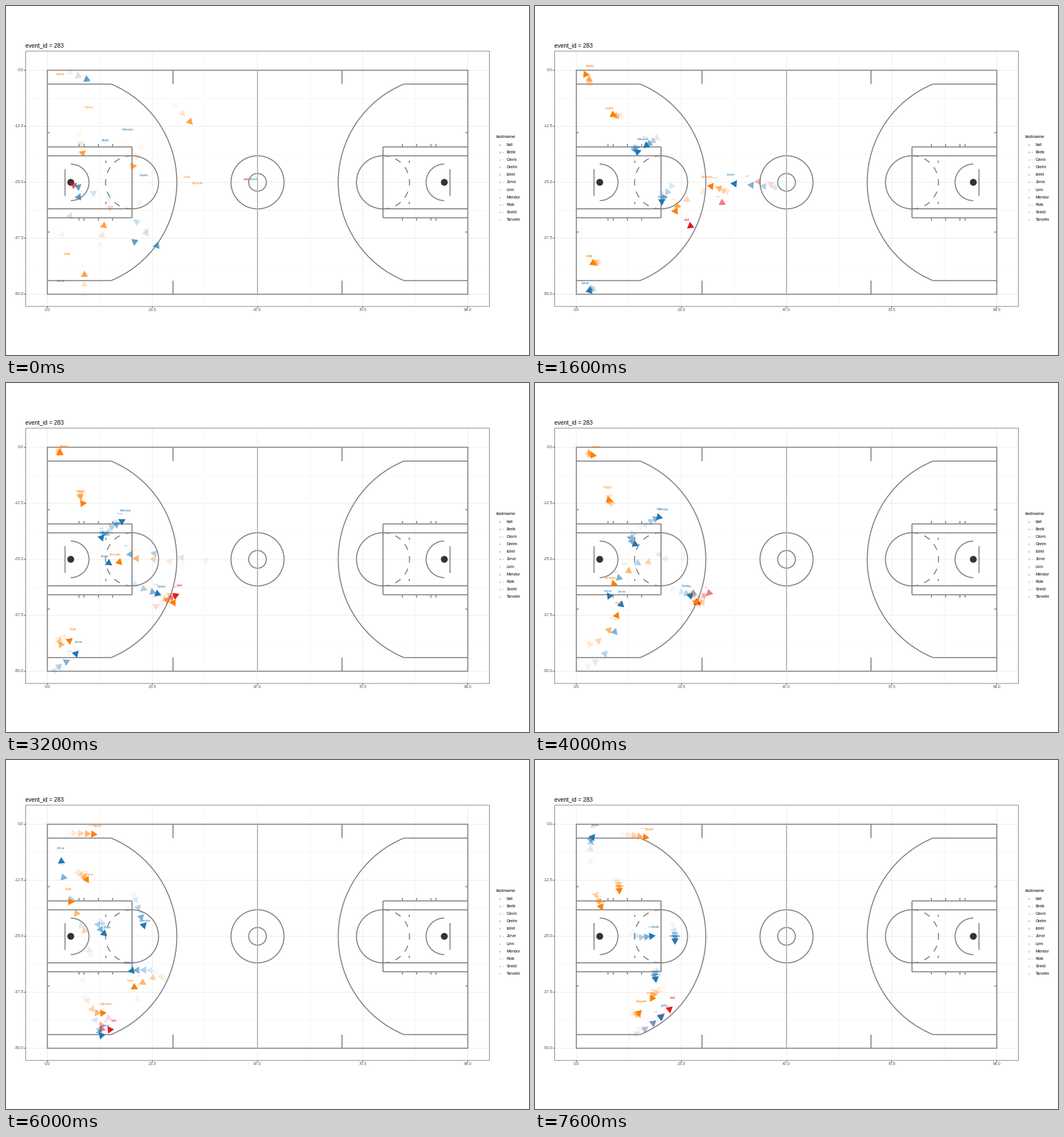
A matplotlib script for the animation above (8 s loop, 917 by 611 pixels).

```python
import numpy as np
import matplotlib.pyplot as plt
from matplotlib.animation import FuncAnimation
from matplotlib.patches import Arc, Circle, Polygon, Rectangle

W, H, DPI = 917, 611, 100
PT = 72 / DPI
FRAMES, INTERVAL = 20, 400
RED, BLUE, ORANGE = "#e31a1c", "#1f78b4", "#ff7f00"
GREY, COURT_WIDTH = "#7f7f7f", 1.75
FADE = [1, .57, .33, .16, .06]
TAIL_FADE = [.72, .2, .07]
RADIUS = 7.4
MID_X, MID_Y = 440.5, 308.2
FOOT = 7.842

plt.rcParams["font.family"] = "Liberation Sans"
plt.rcParams["path.snap"] = False
fig = plt.figure(figsize=(W / DPI, H / DPI), dpi=DPI, facecolor="white")
ax = fig.add_axes([0, 0, 1, 1])
ax.set(xlim=(-.5, W - .5), ylim=(H - .5, -.5))
ax.axis("off")


def line(x0, y0, x1, y1, color=GREY, width=COURT_WIDTH, z=2):
    ax.plot([x0, x1], [y0, y1], color=color, lw=width * PT, zorder=z,
            solid_capstyle="butt")


def label(x, y, text, size, color="black", z=3, **kw):
    return ax.text(x, y, text, fontsize=size * PT, color=color, zorder=z, **kw)


def smooth(t, knots, values):
    """Cubic Hermite curve through the knots."""
    slope = np.gradient(values, knots)
    i = np.clip(np.searchsorted(knots, t, side="right") - 1, 0, len(knots) - 2)
    h = knots[i + 1] - knots[i]
    u = (t - knots[i]) / h
    return ((1 + 2 * u) * (1 - u) ** 2 * values[i] + u ** 2 * (3 - 2 * u) * values[i + 1]
            + h * u * (1 - u) * ((1 - u) * slope[i] - u * slope[i + 1]))


players = []


def track(name, color, tail, *keys):
    """tail: last place and step of the play before; keys: (frame, x, y)."""
    knots, x, y = np.array(keys, float).T
    t = np.arange(FRAMES)
    path = np.column_stack([smooth(t, knots, x), smooth(t, knots, y)])
    players.append((name, color, np.array(tail).reshape(2, 2), path))


track("ball", RED, (118, 313, -64, -40), (0, 421, 318), (2, 384, 307), (4, 266, 389),
      (6, 288, 376), (10, 277, 388), (12, 173, 455), (15, 189, 471), (19, 241, 431))
track("Brelk", BLUE, (126, 316, -27, -11), (0, 174, 250), (4, 178, 262), (7, 167, 270),
      (9, 172, 284), (12, 161, 288), (15, 177, 308), (19, 211, 307))
track("Cavro", ORANGE, (134, 257, 3, 17), (0, 145, 192), (4, 130, 194), (7, 131, 206),
      (10, 127, 197), (15, 145, 215), (19, 148, 235))
track("Grelm", BLUE, (127, 334, 15, -33), (0, 241, 311), (4, 222, 349), (8, 272, 371),
      (12, 245, 367), (15, 213, 370), (19, 212, 390))
track("Istrel", BLUE, (264, 419, 19, 22), (0, 433, 318), (4, 342, 310), (7, 210, 300),
      (10, 127, 379), (12, 159, 461), (15, 174, 480), (19, 226, 445))
track("Jorve", BLUE, (141, 128, 15, 6), (0, 96, 496), (6, 98, 491), (8, 127, 468),
      (10, 152, 380), (14, 98, 198), (16, 97, 148), (19, 105, 129))
track("Lirm", ORANGE, (171, 384, 3, -17), (0, 317, 314), (3, 243, 354), (6, 285, 381),
      (10, 275, 381), (12, 264, 378), (15, 218, 401), (19, 201, 423))
track("Mendur", BLUE, (225, 412, -4, 34), (0, 213, 231), (5, 188, 250), (10, 224, 236),
      (12, 229, 251), (15, 243, 296), (19, 245, 323))
track("Rolk", ORANGE, (137, 470, 0, -17), (0, 107, 449), (5, 95, 454), (7, 103, 457),
      (10, 146, 400), (12, 145, 325), (15, 109, 241), (19, 118, 263))
track("Sneld", ORANGE, (322, 202, 13, 14), (0, 95, 134), (3, 95, 120), (6, 98, 124),
      (10, 108, 127), (15, 160, 130), (19, 200, 136))
track("Tarvelin", ORANGE, (222, 280, -7, 17), (0, 336, 325), (4, 301, 314), (8, 191, 315),
      (10, 132, 356), (12, 145, 428), (15, 176, 442), (19, 187, 437))


def draw_axes():
    left, right, top, bottom = 34, 847, 78.5, 525.5
    for i in range(9):
        x, y = 72 + i * 11.75 * FOOT, 112 + i * 6.25 * FOOT
        major = i % 2 == 0
        color, width = ("#ebebeb", 1) if major else ("#f0f0f0", .6)
        line(x, top, x, bottom, color, width, 0)
        line(left, y, right, y, color, width, 0)
        if major:
            line(x, bottom, x, bottom + 3, "#333333", .9)
            line(left - 3, y, left, y, "#333333", .9)
            label(x, 532, f"{11.75 * i:.1f}", 7, "#4d4d4d", ha="center", va="center")
            label(30, y, f"{0 - 6.25 * i:.1f}", 7, "#4d4d4d", ha="right", va="center")
    ax.add_patch(Rectangle((left, top), right - left, bottom - top, fill=False,
                           ec="#5a5a5a", lw=.8 * PT, zorder=8))
    label(33.5, 71.7, "event_id = 283", 10.1)


def draw_half(side):
    def mx(x):
        return x if side > 0 else 2 * MID_X - x

    def seg(x0, y0, x1, y1):
        line(mx(x0), y0, mx(x1), y1)

    def arc(x, r, start, end):
        if side < 0:
            start, end = 180 - end, 180 - start
        ax.add_patch(Arc((mx(x), MID_Y), 2 * r, 2 * r, theta1=start, theta2=end,
                         ec=GREY, lw=COURT_WIDTH * PT, zorder=2))

    hoop, free_throw = 113, 220.5
    reach = np.degrees(np.arctan2(172, 70))
    arc(hoop, 186, -reach, reach)
    arc(hoop, 32, -90, 90)
    arc(free_throw, 46.5, -90, 90)
    dash = 180 / 13
    for i in range(7):
        arc(free_throw, 46.5, 90 + 2 * i * dash, 90 + (2 * i + 1) * dash)
    for s in (-1, 1):
        def y(d):
            return MID_Y + s * d
        seg(72, y(172), 183, y(172))
        seg(72, y(62), free_throw, y(62))
        seg(72, y(46.4), free_throw, y(46.4))
        seg(292.3, y(172), 292.3, y(196))
        seg(72, y(87), 76, y(87))
        seg(174.5, y(34), 174.5, y(38))
        for x in (127.5, 136.5, 161.5, 186.5):
            seg(x, y(63), x, y(67))
    seg(free_throw, MID_Y - 62, free_throw, MID_Y + 62)
    seg(103, 285, 103, 332)
    ax.add_patch(Circle((mx(hoop), MID_Y), 6, color="#333333", lw=0, zorder=2))


def draw_court():
    draw_half(1)
    draw_half(-1)
    ax.add_patch(Rectangle((72, 112), 94 * FOOT, 50 * FOOT, fill=False, ec=GREY,
                           lw=COURT_WIDTH * PT, zorder=2))
    for r in (15.5, 46.5):
        ax.add_patch(Circle((MID_X, MID_Y), r, fill=False, ec=GREY,
                            lw=COURT_WIDTH * PT, zorder=2))
    line(MID_X, 112, MID_X, 112 + 50 * FOOT, "#b8b8b8", 2)


def draw_legend():
    label(859.5, 230.5, "lastname", 8.3)
    for i, (name, color, *_) in enumerate(players):
        y = 242.7 + 13.15 * i
        label(866, y, "a", 4.6, color, ha="center", va="center", alpha=.85)
        if i in (1, 2, 5, 8, 9):
            line(870.5, y, 871.7, y, color, .9)
        label(877, y, name, 7, va="center")


moving = []


def arrowhead(center, heading, color, alpha, z):
    a = heading + np.radians([0, 120, 240])
    corners = np.column_stack([center[0] + RADIUS * np.cos(a),
                               center[1] + RADIUS * np.sin(a)])
    moving.append(ax.add_patch(Polygon(corners, fc=color, lw=0, alpha=alpha, zorder=z)))


def draw_tails(frame):
    for age, alpha in enumerate(TAIL_FADE[frame:]):
        for _, color, (end, step), _ in players:
            arrowhead(end - age * step, np.arctan2(step[1], step[0]), color, alpha, 4)


def update(frame):
    while moving:
        moving.pop().remove()
    draw_tails(frame)
    for age in range(min(frame, len(FADE) - 1), -1, -1):
        t, z = frame - age, 6 - age / 4
        for name, color, _, path in players:
            tip = path[t]
            if t > 0:
                dx, dy = tip - path[t - 1]
                heading = np.arctan2(dy, dx)
                back = RADIUS * np.array([np.cos(heading), np.sin(heading)])
                arrowhead(tip - back, heading, color, FADE[age], z)
            if age < 3:
                moving.append(label(tip[0], tip[1] - 15, name, 5.9 * FADE[age], color, z + .1,
                                    alpha=FADE[age], ha="center", va="center"))
    return moving


draw_axes()
draw_court()
draw_legend()
anim = FuncAnimation(fig, update, frames=FRAMES, interval=INTERVAL, repeat=True,
                     repeat_delay=0, blit=False)
plt.show()
```
